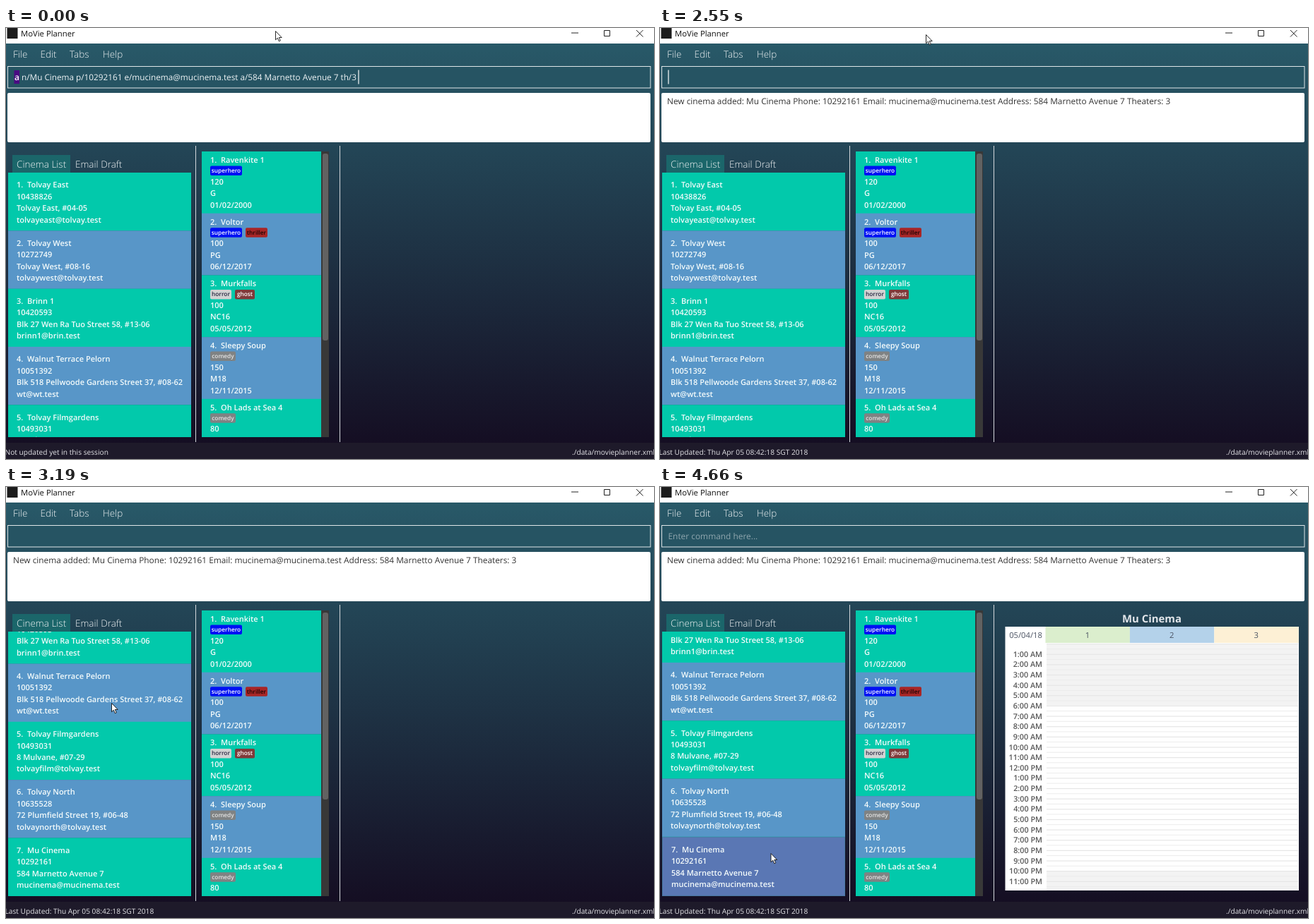
Recreate the animation shown at these times as an HTML page. Size 917 by 611 pixels, loop 6.67 s.

```html
<!DOCTYPE html>
<html lang="en">
<head>
<meta charset="utf-8">
<title>MoVie Planner</title>
<style>
  html, body { margin: 0; width: 100%; height: 100%; overflow: hidden; background: #150d20; }
  svg { display: block; }
  text { font-family: "Open Sans", "Noto Sans", sans-serif; white-space: pre; text-rendering: geometricPrecision; }
  .title { font-size: 11.3px; fill: #111; }
  .menu { font-size: 13.5px; font-weight: 300; fill: #f2f5f6; }
  .cmd { font-size: 11.75px; fill: #eef3f5; }
  .word { font-size: 12px; font-weight: 600; fill: #fff; }
  .hint { font-size: 11.9px; fill: #8fa6ae; }
  .result { font-size: 11.85px; fill: #333; }
  .row { font-size: 11px; font-weight: 600; fill: #f4fbfb; }
  .tag { font-size: 8.3px; font-weight: 600; }
  .status { font-size: 10.2px; fill: #e2e2e6; }
  .head { font-size: 14.9px; font-weight: 700; fill: #e2e6ea; text-anchor: middle; }
  .col { font-size: 11.2px; fill: #4a5262; text-anchor: middle; }
  .hour { font-size: 10.8px; font-weight: 600; fill: #585858; text-anchor: end; }
</style>
</head>
<body>
<script>
const LOOP = 6670, ADDED = 1790, PICKED = 4660;
const GREEN = '#02c9ab', BLUE = '#5896c8';
const CELL = 82.3, MOVIE = 87.7;

const cinemas = [
  ['Tolvay East', '10438826', 'Tolvay East, #04-05', 'tolvayeast@tolvay.test'],
  ['Tolvay West', '10272749', 'Tolvay West, #08-16', 'tolvaywest@tolvay.test'],
  ['Brinn 1', '10420593', 'Blk 27 Wen Ra Tuo Street 58, #13-06', 'brinn1@brin.test'],
  ['Walnut Terrace Pelorn', '10051392', 'Blk 518 Pellwoode Gardens Street 37, #08-62', 'wt@wt.test'],
  ['Tolvay Filmgardens', '10493031', '8 Mulvane, #07-29', 'tolvayfilm@tolvay.test'],
  ['Tolvay North', '10635528', '72 Plumfield Street 19, #06-48', 'tolvaynorth@tolvay.test'],
  ['Mu Cinema', '10292161', '584 Marnetto Avenue 7', 'mucinema@mucinema.test']
];
const movies = [
  ['Ravenkite 1', ['superhero'], '120', 'G', '01/02/2000'],
  ['Voltor', ['superhero', 'thriller'], '100', 'PG', '06/12/2017'],
  ['Murkfalls', ['horror', 'ghost'], '100', 'NC16', '05/05/2012'],
  ['Sleepy Soup', ['comedy'], '150', 'M18', '12/11/2015'],
  ['Oh Lads at Sea 4', ['comedy'], '80', '', '']
];
// width, fill, text colour
const tags = {
  superhero: [45, '#0010f4', '#fff'],
  thriller: [31, '#a82626', '#180404'],
  horror: [30, '#d3d3d3', '#262640'],
  ghost: [28, '#803a3a', '#fff'],
  comedy: [36, '#7f8283', '#e4e4e4']
};

const rect = (x, y, w, h, fill, more = '') =>
  `<rect x="${x}" y="${y}" width="${w}" height="${h}" fill="${fill}" ${more}/>`;
const text = (x, y, cls, s, more = '') => `<text x="${x}" y="${y}" class="${cls}" ${more}>${s}</text>`;
const line = (d, color, w = 1) => `<path d="${d}" fill="none" stroke="${color}" stroke-width="${w}"/>`;
const stripe = i => i % 2 ? BLUE : GREEN;

function cinemaCell([name, ...rest], i) {
  const y = i * CELL;
  const lines = [`${i + 1}.  ${name}`, ...rest].map((s, k) => text(12, y + 21.3 + 16.45 * k, 'row', s)).join('');
  const last = i === cinemas.length - 1;
  const box = rect(0, y, 259, CELL + 0.3, stripe(i));
  const picked = rect(0.5, y + 0.5, 258, CELL + 1, '#5a77b4', 'id="picked" stroke="#4a7aa4"');
  return last ? box + picked + `<g id="lastText">${lines}</g>` : box + lines;
}

function movieCell([name, kinds, ...rest], i) {
  const y = i * MOVIE;
  let x = 12, out = rect(0, y, 169, MOVIE + 0.3, stripe(i)) + text(12, y + 16, 'row', `${i + 1}.  ${name}`);
  for (const kind of kinds) {
    const [w, fill, ink] = tags[kind];
    out += rect(x, y + 20.5, w, 13.5, fill, 'rx="2"') +
      text(x + w / 2, y + 30, 'tag', kind, `fill="${ink}" text-anchor="middle"`);
    x += w + 5;
  }
  return out + rest.map((s, k) => text(12, y + 46.5 + 16.5 * k, 'row', s)).join('');
}

function schedule() {
  const hourY = h => 222 + 14.64 * h;
  let out = text(696, 191.8, 'head', 'Mu Cinema') + rect(488.5, 198, 415.5, 374, '#fff');
  ['#dbeecd', '#b4d2ea', '#fdf0d5'].forEach((fill, i) => {
    out += rect(545.5 + 119.4 * i, 198, 119.4, 23, fill) + text(605 + 119.3 * i, 213.8, 'col', i + 1);
  });
  out += text(517.5, 213.8, 'col', '05/04/18');
  out += rect(547, 222, 356, hourY(6) - 222, '#f3f3f3') + rect(547, hourY(22), 356, 572 - hourY(22), '#f3f3f3');
  for (let h = 0; h < 24; h++) {
    const y = hourY(h);
    out += rect(547, y, 356, 1.2, '#e6e6e6') + rect(547, y + 7.3, 356, 1, '#ececec');
    if (h) out += text(541, y + 4.1, 'hour', `${h % 12 || 12}:00 ${h < 12 ? 'AM' : 'PM'}`);
  }
  return out;
}

const [guest, phone, street, mail] = cinemas[6];

document.body.innerHTML = `<svg width="917" height="611" viewBox="0 0 917 611">
  <defs><linearGradient id="bg" x1="0" y1="0" x2="0" y2="1">
    <stop offset="0" stop-color="#295c6b"/><stop offset="1" stop-color="#140b20"/>
  </linearGradient></defs>
  ${rect(0, 0, 917, 611, 'url(#bg)')}
  ${rect(0, 588, 917, 23, '#1e1a2a')}
  ${rect(0, 0, 917, 22, '#fff')}
  ${rect(1.5, 0, 15, 15, '#1c1c1c')}
  ${text(21, 11.8, 'title', 'MoVie Planner')}
  ${line('M800 7h10M846.5 3.5h8v8h-8zM892 3l9.500 9.500M901.500 3l-9.500 9.500', '#222')}
  ${[['File', 10], ['Edit', 48.5], ['Tabs', 90], ['Help', 137]].map(([s, x]) => text(x, 41.5, 'menu', s)).join('')}
  ${rect(2.5, 54.5, 909.5, 30.5, '#265463', 'stroke="#dfe6e8"')}
  <g id="typed">
    ${rect(11.5, 60, 7.5, 19, '#4a0a82')}
    ${text(12, 74.2, 'word', 'a')}
    ${text(22, 74.2, 'cmd', `n/${guest} p/${phone} e/${mail} a/${street} th/3`)}
  </g>
  ${text(11.5, 74.2, 'hint', 'Enter command here...', 'id="hint"')}
  ${rect(0, 59.5, 1.3, 20, '#e8eef0', 'id="caret"')}
  ${rect(2, 92, 910, 70, '#fff', 'rx="2"')}
  ${text(10, 108, 'result', `New cinema added: ${guest} Phone: ${phone} Email: ${mail} Address: ${street} Theaters: 3`, 'id="result"')}
  ${rect(9, 180, 82, 25, '#1b666a')}
  ${text(15, 198, 'menu', 'Cinema List')}
  ${text(98, 198, 'menu', 'Email Draft')}
  <svg x="3" y="205" width="259" height="375"><g id="list">${cinemas.map(cinemaCell).join('')}</g></svg>
  <svg x="277" y="175" width="169" height="405">${movies.map(movieCell).join('')}</svg>
  ${rect(446, 175, 11, 405, '#383838')}
  ${rect(448, 178, 8, 265, '#626262', 'rx="3"')}
  ${line('M268.500 167v420M472.500 167v420', '#d4d8dc')}
  <g id="schedule">${schedule()}</g>
  ${text(-1.5, 605, 'status', '', 'id="status"')}
  ${text(801, 605, 'status', './data/movieplanner.xml')}
  <path id="mouse" d="M.5 .5v12.300l2.800-2.600 2 4.600 2-.9-2-4.400h3.900z" fill="#fff" stroke="#111" stroke-width=".9"/>
</svg>`;

const ui = {};
document.querySelectorAll('[id]').forEach(el => ui[el.id] = el);

// [time, value...] rows, each held until the next
const caretSteps = [[0, 1], [440, 0], [900, 1], [1450, 0], [1790, 1], [2150, 0], [2550, 1], [3100, 0], [3550, 1], [4100, 0]];
const scrollSteps = [[0, 0], [3100, 101], [3190, 201.4], [4660, 203]];
const mouseSteps = [
  [0, 381, 4], [2550, 376, 9], [2630, 350, 38], [2710, 299, 99], [2780, 238, 178], [2860, 188, 249],
  [2940, 158, 294], [3010, 149, 306], [3470, 152, 317], [3550, 161, 350], [3620, 171, 398],
  [3700, 177, 444], [3780, 174, 480], [3850, 167, 501], [3930, 162, 510], [4100, 159, 516], [4170, 156.5, 519]
];
const at = (steps, t) => steps.filter(s => s[0] <= t).pop().slice(1);
const show = (el, on) => el.setAttribute('visibility', on ? 'visible' : 'hidden');
const move = (el, x, y) => el.setAttribute('transform', `translate(${x} ${y})`);

function draw(t) {
  const added = t >= ADDED, picked = t >= PICKED;
  show(ui.typed, !added);
  show(ui.result, added);
  show(ui.hint, picked);
  show(ui.picked, picked);
  show(ui.schedule, picked);
  show(ui.caret, at(caretSteps, t)[0]);
  ui.caret.setAttribute('x', added ? 11.3 : 498.3);
  ui.status.textContent = added ? 'Last Updated: Thu Apr 05 08:42:18 SGT 2018' : 'Not updated yet in this session';
  move(ui.list, 0, -at(scrollSteps, t)[0]);
  move(ui.lastText, picked ? 1 : 0, picked ? 0.8 : 0);
  move(ui.mouse, ...at(mouseSteps, t));
}

const start = performance.now();
function tick() {
  draw((performance.now() - start) % LOOP);
  requestAnimationFrame(tick);
}
tick();
</script>
</body>
</html>
```
